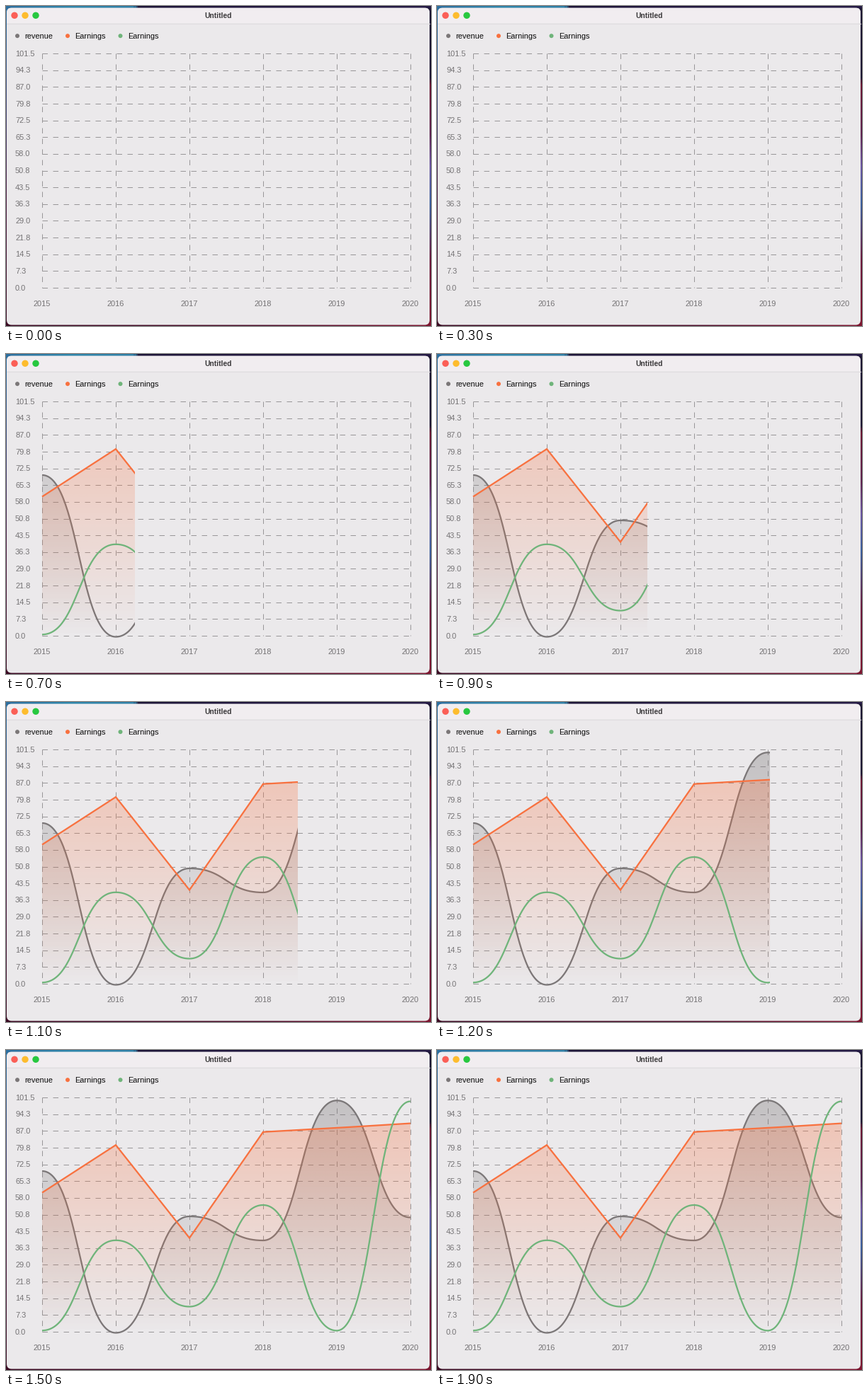
A matplotlib script that plays this animation: 600 px wide and 452 px high, repeating every 2000 ms.

```python
import numpy as np
import matplotlib.pyplot as plt
from matplotlib.animation import FuncAnimation
from matplotlib.colors import LinearSegmentedColormap, to_rgb
from matplotlib.patches import Circle, FancyBboxPatch, Rectangle
from matplotlib.path import Path

W, H, DPI = 600, 452, 64
PX = 72 / DPI
FRAMES, INTERVAL = 20, 100

LEFT, RIGHT, TOP, BASE = 51, 571, 67, 398
STEP = (RIGHT - LEFT) / 5
GREY, ORANGE, GREEN = "#7b7778", "#f8713f", "#6fb47a"

plt.rcParams["font.family"] = "Liberation Sans"
fig = plt.figure(figsize=(W / DPI, H / DPI), dpi=DPI)
ax = fig.add_axes([0, 0, 1, 1])
ax.axis("off")


def strip(box, stops, vertical):
    """Thin colour gradient along one edge of the desktop."""
    cmap = LinearSegmentedColormap.from_list("strip", stops)
    ramp = cmap(np.linspace(0, 1, 300))
    ramp = ramp[:, None] if vertical else ramp[None, :]
    x0, x1, y0, y1 = box
    ax.imshow(ramp, extent=(x0, x1, y1, y0), aspect="auto",
              interpolation="nearest", zorder=0)


def label(x, y, s, color, size=11, ha="left", weight="normal"):
    ax.text(x, y, s, color=color, fontsize=size * PX, ha=ha, va="baseline",
            weight=weight, zorder=4)


def dot(x, y, r, color):
    ax.add_patch(Circle((x, y), r, fc=color, lw=0, zorder=4))


def window():
    strip((0, W, 0, 9), [(0, "#2d6f9f"), (0.15, "#2f86ab"), (0.3, "#2f7fa6"),
                         (0.31, "#1d1538"), (1, "#251a45")], False)
    strip((0, W, 443, H), [(0, "#3a0a22"), (0.6, "#4a0c28"),
                           (1, "#7c1630")], False)
    strip((0, 9, 3, 448), [(0, "#2d6f9f"), (0.3, "#3c4474"),
                           (0.6, "#4a1a40"), (1, "#3a0a22")], True)
    strip((591, W, 3, 448), [(0, "#1c1632"), (0.22, "#1c1632"),
                             (0.24, "#6b1733"), (0.4, "#5e2450"),
                             (0.5, "#6a55a0"), (0.62, "#3a5f9c"),
                             (0.8, "#6b1a3c"), (1, "#7c1630")], True)
    shape = dict(boxstyle="round,pad=0,rounding_size=7", lw=0)
    frame = FancyBboxPatch((1, 2.5), 597, 448, fc="#ebe9eb", zorder=1, **shape)
    ax.add_patch(frame)
    bar = Rectangle((1, 2.5), 597, 21.5, fc="#f1edf0", lw=0, zorder=1.1)
    ax.add_patch(bar)
    bar.set_clip_path(frame)
    ax.plot([1, 598], [24.5, 24.5], color="#dedbde", lw=PX, zorder=1.2)
    for x, color in zip((12, 27, 42), ("#fb5f57", "#fdbc2e", "#28c840")):
        dot(x, 13.3, 4.7, color)
    label(300, 17, "Untitled", "#3c3a3c", 10.3, "center", "bold")


def chart_grid():
    style = dict(color="#989698", lw=PX, dashes=(7.5, 7.5),
                 dash_capstyle="butt", zorder=2)
    for i, y in enumerate(np.linspace(BASE, TOP, 15)):
        ax.plot([LEFT, RIGHT], [y, y], **style)
        value = int(7.25 * i * 10 + 0.5) / 10
        label(13, y + 3.6, f"{value:.1f}", "#747274")
    for i in range(6):
        x = LEFT + i * STEP
        ax.plot([x, x], [TOP, BASE], **style)
        label(x - 0.3, 424, str(2015 + i), "#747274", ha="center")


def legend():
    names = ("revenue", "Earnings", "Earnings")
    for x, name, color in zip((16, 87, 161.5), names, (GREY, ORANGE, GREEN)):
        dot(x, 42.2, 3, color)
        label(x + 10.5, 46, name, "#0c0c0c")


def curve(ys, smooth):
    """Points through ys; smooth segments are Béziers with level tangents."""
    t = np.linspace(0, 1, 60)
    fx = 1.5 * t - 1.5 * t**2 + t**3 if smooth else t
    fy = 3 * t**2 - 2 * t**3 if smooth else t
    pairs = list(zip(ys, ys[1:]))
    x = np.concatenate([LEFT + (i + fx) * STEP for i in range(len(pairs))])
    y = np.concatenate([a + (b - a) * fy for a, b in pairs])
    return x, y


def area(x, y, color, alpha):
    """Vertical fade below a curve; its width is set while animating."""
    top = y.min()
    fade = np.empty((256, 2, 4))
    fade[..., :3] = to_rgb(color)
    fade[..., 3] = np.linspace(alpha, 0, 256)[:, None]
    im = ax.imshow(fade, extent=(LEFT, RIGHT, BASE, top), aspect="auto",
                   interpolation="bilinear", zorder=3)
    outline = np.column_stack([np.r_[x, RIGHT, LEFT], np.r_[y, BASE, BASE]])
    im.set_clip_path(Path(outline), ax.transData)
    return im, top


SERIES = [
    ([171, 399.5, 235, 269, 71.3, 236.5], GREY, True, 0.35),
    ([201.5, 134.2, 265.5, 115.8, 110, 103.6], ORANGE, False, 0.3),
    ([396.2, 268.8, 362.5, 219, 396.4, 72.5], GREEN, True, 0),
]

window()
chart_grid()
legend()
lines, areas = [], []
for ys, color, smooth, alpha in SERIES:
    x, y = curve(ys, smooth)
    if alpha:
        areas.append(area(x, y, color, alpha))
    lines += ax.plot(x, y, color=color, lw=2.25 * PX, zorder=3,
                     solid_capstyle="butt", solid_joinstyle="miter")
# Keep each line directly above its own fade.
for i, line in enumerate(lines):
    line.set_zorder(3 + 0.2 * i + 0.1)
for i, (im, _) in enumerate(areas):
    im.set_zorder(3 + 0.2 * i)

ax.set_xlim(0, W)
ax.set_ylim(H, 0)


def draw(n):
    edge = np.interp(n, [4, 5, 7, 13, 13.76], [LEFT, 59.5, 182, 527, RIGHT])
    shown = edge > LEFT
    mask = Rectangle((LEFT - 1, 60), edge - LEFT + 1, 345,
                     transform=ax.transData)
    for line in lines:
        line.set_visible(shown)
        line.set_clip_path(mask)
    for im, top in areas:
        im.set_visible(shown)
        if shown:
            im.set_extent((LEFT, edge, BASE, top))
    ax.set_xlim(0, W)
    ax.set_ylim(H, 0)
    return lines + [im for im, _ in areas]


anim = FuncAnimation(fig, draw, frames=FRAMES, interval=INTERVAL,
                     init_func=lambda: draw(0), repeat=True, repeat_delay=0)
plt.show()
```
